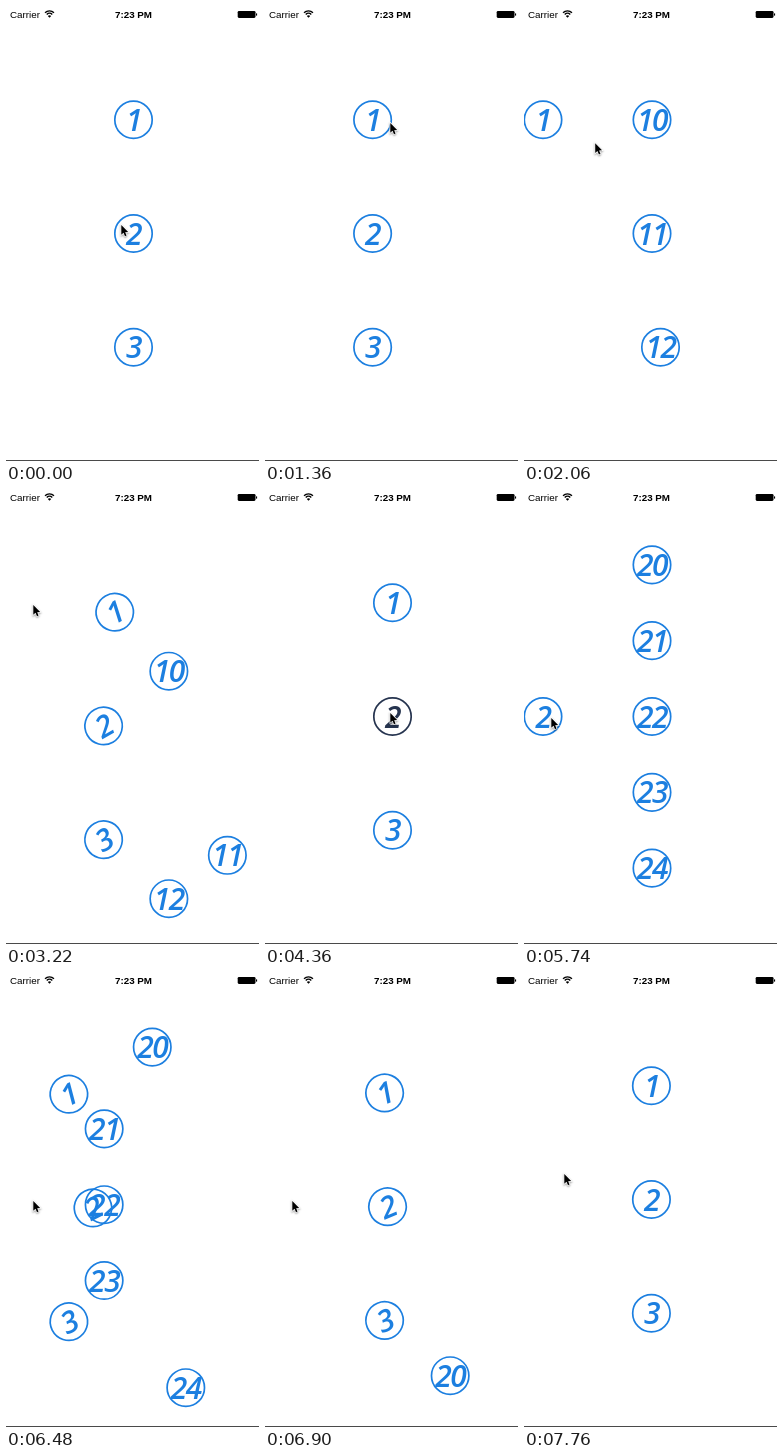
An HTML page with a canvas for the animation above (7.78 s loop, 253 by 455 pixels).

```html
<!DOCTYPE html>
<html lang="en">
<head>
<meta charset="utf-8">
<title>Bouncing menu</title>
<style>
html, body { margin: 0; width: 253px; height: 455px; overflow: hidden; background: #fff; }
canvas { display: block; }
</style>
</head>
<body>
<canvas id="stage" width="253" height="455"></canvas>
<script>
const W = 253, H = 455, LOOP = 7780;
const ctx = document.getElementById('stage').getContext('2d');

const BLUE = '#1c7fe0', DARK = '#26344f';
const HOME = 127.5, DOCK = 19, SUB_X = 128;
const AWAY = 173;       // how far the unpicked items slide out
const PULL = 1950;      // half the sideways acceleration, px/s²
const BOUNCE = 0.335;   // speed kept after hitting a wall
const DROP = 1274;      // half the falling acceleration, px/s²
const PUSH = 271;       // speed of the farewell push, px/s
const STAGGER = 0.132;

// Times in ms; angles are the push direction of each leaving item, in degrees.
const visits = [
  { pick: 0, press: 1150, go: 1260, enter: 1337, tap: 2775, back: 2870,
    labels: ['10', '11', '12'], angles: [-68.5, -11, -68.5] },
  { pick: 1, press: 4290, go: 4420, enter: 4490, tap: 6185, back: 6284,
    labels: ['20', '21', '22', '23', '24'], angles: [-70, -124, -124, -124, -14] }
];

// Pointer moves: start, end, from x, y, to x, y, sag
const moves = [
  [120, 800, 115, 219, 125, 117, 0],
  [1690, 2384, 125, 117, 27, 116, 21],
  [3300, 4150, 27, 116, 125, 224, 0],
  [4765, 5440, 125, 224, 27, 229, 4],
  [7060, 7740, 27, 229, 40, 202, 0]
];

const rowY = (i, n) => H * (i + 1) / (n + 1);

// Distance left to the wall after falling towards it from d, with bounces.
function bounce(d, t) {
  if (t <= 0) return d;
  const hit = Math.sqrt(d / PULL);
  if (t < hit) return d - PULL * t * t;
  let s = t - hit, hop = 2 * BOUNCE * hit;
  while (hop > 0.01) {
    if (s < hop) return PULL * s * (hop - s);
    s -= hop;
    hop *= BOUNCE;
  }
  return 0;
}

function badge(label, x, y, turn, color) {
  ctx.save();
  ctx.translate(x, y);
  ctx.rotate(turn * Math.PI / 180);
  ctx.strokeStyle = ctx.fillStyle = color;
  ctx.lineWidth = 1.7;
  ctx.beginPath();
  ctx.arc(0, 0, 18.7, 0, Math.PI * 2);
  ctx.stroke();
  ctx.font = 'italic 600 30px "Open Sans", "Noto Sans", sans-serif';
  ctx.letterSpacing = '-1.5px';
  ctx.textAlign = 'center';
  ctx.textBaseline = 'alphabetic';
  ctx.fillText(label, 0, 11);
  ctx.restore();
}

function mainItem(i, ms) {
  const visit = ms < 4000 ? visits[0] : visits[1];
  const picked = i === visit.pick;
  let x = HOME, y = rowY(i, 3), turn = 0, color = BLUE;
  if (ms >= visit.back) {
    const t = (ms - visit.back) / 1000;
    x -= (picked ? HOME - DOCK : AWAY) * Math.exp(-5 * t);
    const sway = t < 1.45 ? 78 * t * Math.exp(-t / 0.331) * (1 - Math.pow(t / 1.45, 4)) : 0;
    y += sway;
    turn = -3.15 * sway;
  } else if (ms >= visit.go) {
    const t = (ms - visit.go) / 1000;
    x = picked ? DOCK + bounce(HOME - DOCK, t) : HOME - Math.min(AWAY, PULL * t * t);
  }
  const held = (ms >= visit.press && ms < visit.go) || (ms >= visit.tap && ms < visit.back);
  if (picked && held) color = DARK;
  badge(String(i + 1), x, y, turn, color);
}

function subItems(visit, ms) {
  visit.labels.forEach((label, i) => {
    const t = (ms - visit.enter) / 1000 - i * STAGGER;
    if (t < 0) return;
    let x = SUB_X + bounce(165, t), y = rowY(i, visit.labels.length);
    if (ms > visit.back) {
      const s = (ms - visit.back) / 1000, a = visit.angles[i] * Math.PI / 180;
      x += PUSH * Math.cos(a) * s;
      y += PUSH * Math.sin(a) * s + DROP * s * s;
    }
    if (y < H + 25) badge(label, x, y, 0, BLUE);
  });
}

function statusBar() {
  ctx.fillStyle = ctx.strokeStyle = '#000';
  ctx.textBaseline = 'alphabetic';
  ctx.textAlign = 'left';
  ctx.font = '9.8px "Liberation Sans", Arial, sans-serif';
  ctx.fillText('Carrier', 4, 12);
  ctx.textAlign = 'center';
  ctx.font = 'bold 9.8px "Liberation Sans", Arial, sans-serif';
  ctx.fillText('7:23 PM', 127.5, 12);

  ctx.lineWidth = 1.4;
  for (const r of [6.3, 3.9]) {
    ctx.beginPath();
    ctx.arc(43.5, 11.2, r, -Math.PI * 0.75, -Math.PI * 0.25);
    ctx.stroke();
  }
  ctx.beginPath();
  ctx.moveTo(43.5, 11.8);
  ctx.arc(43.5, 11.8, 2.4, -Math.PI * 0.75, -Math.PI * 0.25);
  ctx.fill();

  ctx.beginPath();
  ctx.roundRect(231.7, 5, 17.8, 6.9, 1.3);
  ctx.fill();
  ctx.fillRect(250, 7.4, 1.1, 2.2);

  ctx.fillStyle = '#4a4a4a';
  ctx.fillRect(0, 454, W, 1);
}

function pointer(ms) {
  let [, , x, y] = moves[0];
  for (const [start, end, x0, y0, x1, y1, sag] of moves) {
    if (ms < start) break;
    const p = Math.min(1, (ms - start) / (end - start));
    const e = p * p * (3 - 2 * p);
    x = x0 + (x1 - x0) * e;
    y = y0 + (y1 - y0) * e + sag * Math.sin(Math.PI * p);
  }
  ctx.save();
  ctx.translate(x + 0.3, y + 0.4);
  ctx.scale(0.88, 0.88);
  ctx.beginPath();
  for (const [px, py] of [[0, -0.5], [0, 10.6], [2.5, 8.3], [4.2, 12.2], [6, 11.4], [4.4, 7.7], [7.8, 7.5]])
    ctx.lineTo(px, py);
  ctx.closePath();
  ctx.shadowColor = 'rgba(0,0,0,0.4)';
  ctx.shadowBlur = 2;
  ctx.shadowOffsetY = 1;
  ctx.strokeStyle = '#fff';
  ctx.lineWidth = 1.6;
  ctx.stroke();
  ctx.shadowColor = 'transparent';
  ctx.fillStyle = '#000';
  ctx.fill();
  ctx.restore();
}

function draw(ms) {
  ctx.fillStyle = '#fff';
  ctx.fillRect(0, 0, W, H);
  statusBar();
  for (let i = 0; i < 3; i++) mainItem(i, ms);
  for (const visit of visits) subItems(visit, ms);
  pointer(ms);
}

const begin = performance.now();
function tick() {
  draw((performance.now() - begin) % LOOP);
  requestAnimationFrame(tick);
}
tick();
</script>
</body>
</html>
```
